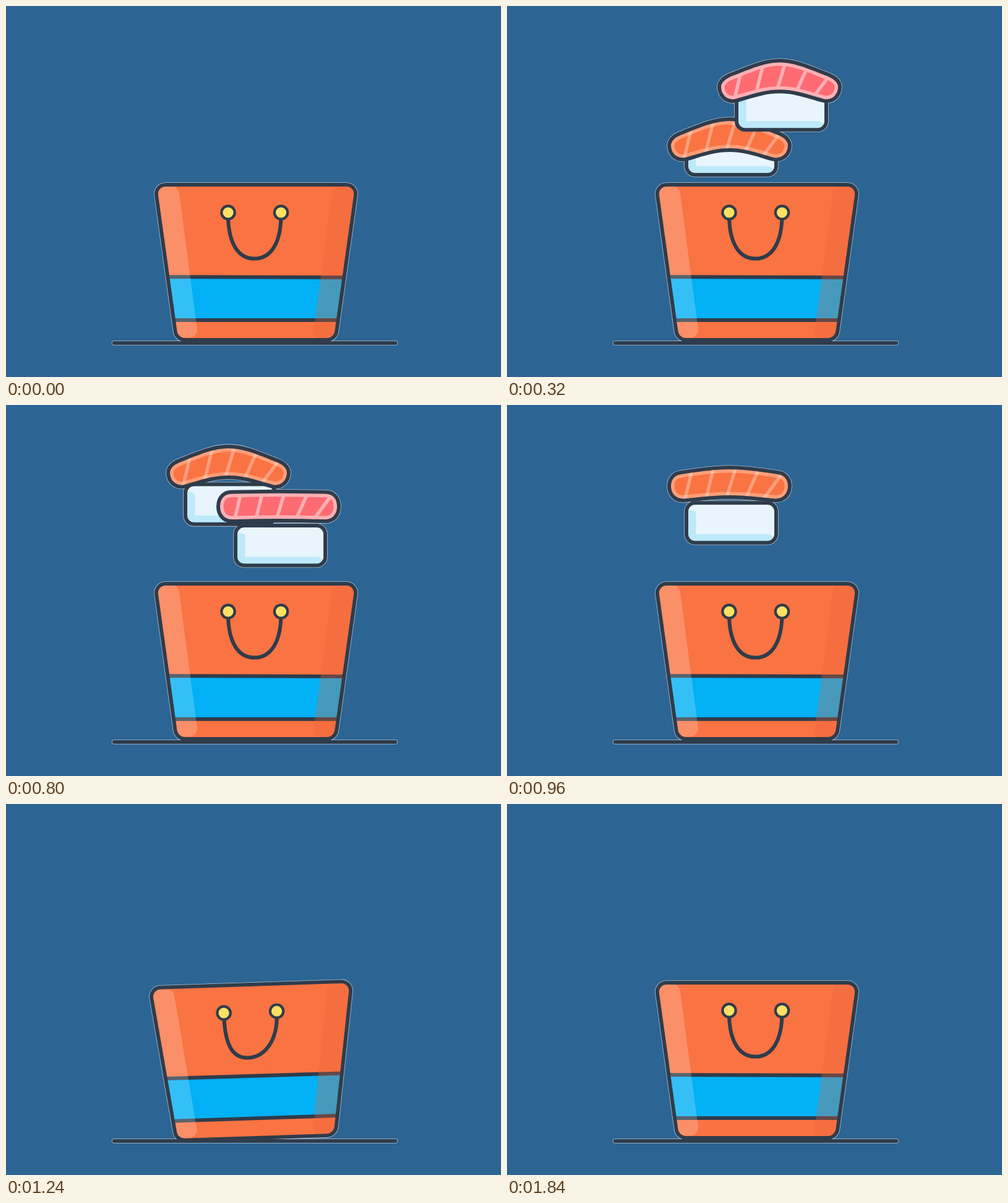
Recreate the animation shown at these times as an HTML page with a canvas. Size 800x600 px, loop 1920 ms.

```html
<!DOCTYPE html>
<html lang="en">
<head>
<meta charset="utf-8">
<title>Sushi bag</title>
<style>
  html, body { margin: 0; width: 100%; height: 100%; overflow: hidden; background: #2c6493; }
  canvas { display: block; width: 800px; height: 600px; }
</style>
</head>
<body>
<canvas id="stage" width="800" height="600"></canvas>
<script>
const ctx = document.getElementById('stage').getContext('2d');
const LOOP = 1920, STEP = 40, LAST = 1840;
const INK = '#2f3c4b', ORANGE = '#fa7342', HALO = 'rgba(255,255,255,.6)';

// The pink roll runs ahead of the orange one by `lead` ms; `depth` and `rise` shape the way up.
const rolls = [
  { x: 359.5, lead: 0, depth: 562, rise: 986,
    light: '#ff9e78', dark: ORANGE, stripe: 'rgba(255,255,255,.3)' },
  { x: 440.5, lead: 230, depth: 255, rise: 702,
    light: '#ffb0b4', dark: '#ff6b72', stripe: '#ffb0b4' }
];

// One half sine of length d that begins at t0.
const pulse = (t, t0, d) => Math.sin(Math.PI * Math.min(1, Math.max(0, (t - t0) / d)));

// Quartic ease up, cubic ease down; the rice lags behind and the fish straightens as it drops.
function flight(roll, t) {
  const u = t + roll.lead;
  const up = roll.depth * Math.max(0, 1 - t / roll.rise) ** 4;
  const down = 23 * Math.max(0, (u - 760) / 200) ** 3;
  const y = 108 + up + down;
  const bend = Math.min(1, 1 - (u - 800) / 240);
  const gap = 48 + .54 * Math.max(0, u - 320) ** .68;
  return { ...roll, y, bend, riceY: y + gap, fish: fishPath(bend) };
}

// The bag is knocked right, then left, as each roll lands.
const tilt = t => 2.72 * (pulse(t, 960, 180) - pulse(t, 1195, 180));
const squash = t => .006 * Math.abs(tilt(t));

function handleSwing(t) {
  if (t < 960) return [0, 0];
  const fade = (LAST - t) / 880;
  return [9 * fade * Math.sin((t - 960) / 380 * 2 * Math.PI), 2.5 * pulse(t, 1640, 200)];
}

function roundPoly(pts, radii) {
  const p = new Path2D(), n = pts.length, [a, b] = [pts[0], pts[n - 1]];
  p.moveTo((a[0] + b[0]) / 2, (a[1] + b[1]) / 2);
  pts.forEach((q, i) => p.arcTo(...q, ...pts[(i + 1) % n], radii[i]));
  p.closePath();
  return p;
}

function rounded(x, y, w, h, r) {
  const p = new Path2D();
  p.roundRect(x, y, w, h, r);
  return p;
}

// Right half from top to bottom, then its mirror image back up.
function fishPath(b) {
  const top = -24 - 18 * b, low = 23 - 15 * b;
  const right = [
    [0, top], [25, top], [50, -24 - 7 * b], [76 + 6 * b, -24 + 6 * b],
    [90 + 2 * b, -24 + 10 * b], [97.5, -14 + 8 * b], [97.5, 0],
    [97.5, 14], [88, 24], [74, 23.5],
    [56, 23 - 3 * b], [30, low], [0, low]
  ];
  const left = right.map(([x, y]) => [-x, y]).reverse();
  const p = new Path2D();
  p.moveTo(0, top);
  for (const side of [right, left])
    for (let i = 1; i < side.length; i += 3)
      p.bezierCurveTo(...side[i], ...side[i + 1], ...side[i + 2]);
  p.closePath();
  return p;
}

const rice = rounded(-72.5, -64.5, 145, 64.5, 14);
const riceSide = rounded(-74, -52, 17, 54, [0, 6, 0, 0]);
const riceBase = rounded(-74, -14, 144, 16, [0, 12, 0, 0]);
const bag = roundPoly([[240.6, 289], [567.4, 289], [532.4, 540], [275.4, 540]], [15, 15, 16, 16]);
const shine = roundPoly([[225, 291.5], [278.5, 291.5], [310.8, 536.5], [225, 536.5]], [0, 12, 13, 0]);
const shade = roundPoly([[528.2, 291.5], [590, 291.5], [590, 537], [495.6, 537]], [10, 0, 0, 10]);
const floor = new Path2D('M174.5 545H629.5');

function fill(path, color) {
  ctx.fillStyle = color;
  ctx.fill(path);
}

function stroke(path, color, width) {
  ctx.strokeStyle = color;
  ctx.lineWidth = width;
  ctx.stroke(path);
}

function at(x, y, draw) {
  ctx.save();
  ctx.translate(x, y);
  draw();
  ctx.restore();
}

function clipped(path, draw) {
  ctx.save();
  ctx.clip(path);
  draw();
  ctx.restore();
}

function drawStripes(s) {
  for (let i = 0; i < 5; i++) {
    const x = 34.5 * i - 66, y = -18 * s.bend * (1 - (x / 90) ** 2);
    const slant = .24 + .5 * (i / 4) ** 3;
    const line = new Path2D();
    line.moveTo(x + 40 * slant, y - 40);
    line.lineTo(x - 40 * slant, y + 40);
    stroke(line, s.stripe, 5.5);
  }
}

function drawRoll(s) {
  at(s.x + 3, s.riceY, () => {
    fill(rice, '#e8f5fc');
    clipped(rice, () => {
      fill(riceSide, '#bde9fa');
      fill(riceBase, '#bde9fa');
    });
    stroke(rice, INK, 6);
  });
  at(s.x, s.y, () => {
    fill(s.fish, s.dark);
    clipped(s.fish, () => {
      stroke(s.fish, s.light, 17);
      drawStripes(s);
    });
    stroke(s.fish, INK, 6);
  });
}

function tilted(t, draw) {
  at(402, 541, () => {
    ctx.scale(1, 1 - squash(t));
    ctx.rotate(tilt(t) * Math.PI / 180);
    ctx.translate(-402, -541);
    draw();
  });
}

function drawBag(t) {
  fill(bag, ORANGE);
  clipped(bag, () => {
    ctx.fillStyle = '#01b0f5';
    ctx.fillRect(230, 438, 350, 70);
    stroke(new Path2D('M230 438L580 439M230 508H580'), INK, 6);
    fill(shine, 'rgba(255,255,255,.2)');
    fill(shade, 'rgba(231,101,59,.3)');
  });
  stroke(bag, INK, 6);

  const [dx, dy] = handleSwing(t);
  const x = 401.5 + dx, y = 408.6 + dy;
  stroke(new Path2D(`M359 338C359 384 ${x - 26} ${y} ${x} ${y}S444.5 384 444.5 338`), INK, 6);
  for (const cx of [359, 444.5]) {
    const knob = new Path2D();
    knob.arc(cx, 334, 10.7, 0, 7);
    fill(knob, '#fee063');
    stroke(knob, INK, 4.2);
  }
}

function drawFloor(color, width) {
  ctx.lineCap = 'round';
  stroke(floor, color, width);
  ctx.lineCap = 'butt';
}

function draw(t) {
  ctx.fillStyle = '#2c6493';
  ctx.fillRect(0, 0, 800, 600);
  const visible = rolls.map(r => flight(r, t)).filter(s => s.y < 334);

  // Thin pale rim around every silhouette.
  for (const s of visible) {
    at(s.x + 3, s.riceY, () => stroke(rice, HALO, 7.6));
    at(s.x, s.y, () => stroke(s.fish, HALO, 7.6));
  }
  tilted(t, () => stroke(bag, HALO, 7.6));
  drawFloor(HALO, 7.4);

  visible.forEach(drawRoll);
  tilted(t, () => drawBag(t));
  drawFloor(INK, 5.8);
}

const start = performance.now();
function tick() {
  const t = (performance.now() - start) % LOOP;
  draw(Math.min(Math.floor(t / STEP) * STEP, LAST));
  requestAnimationFrame(tick);
}
tick();
</script>
</body>
</html>
```
